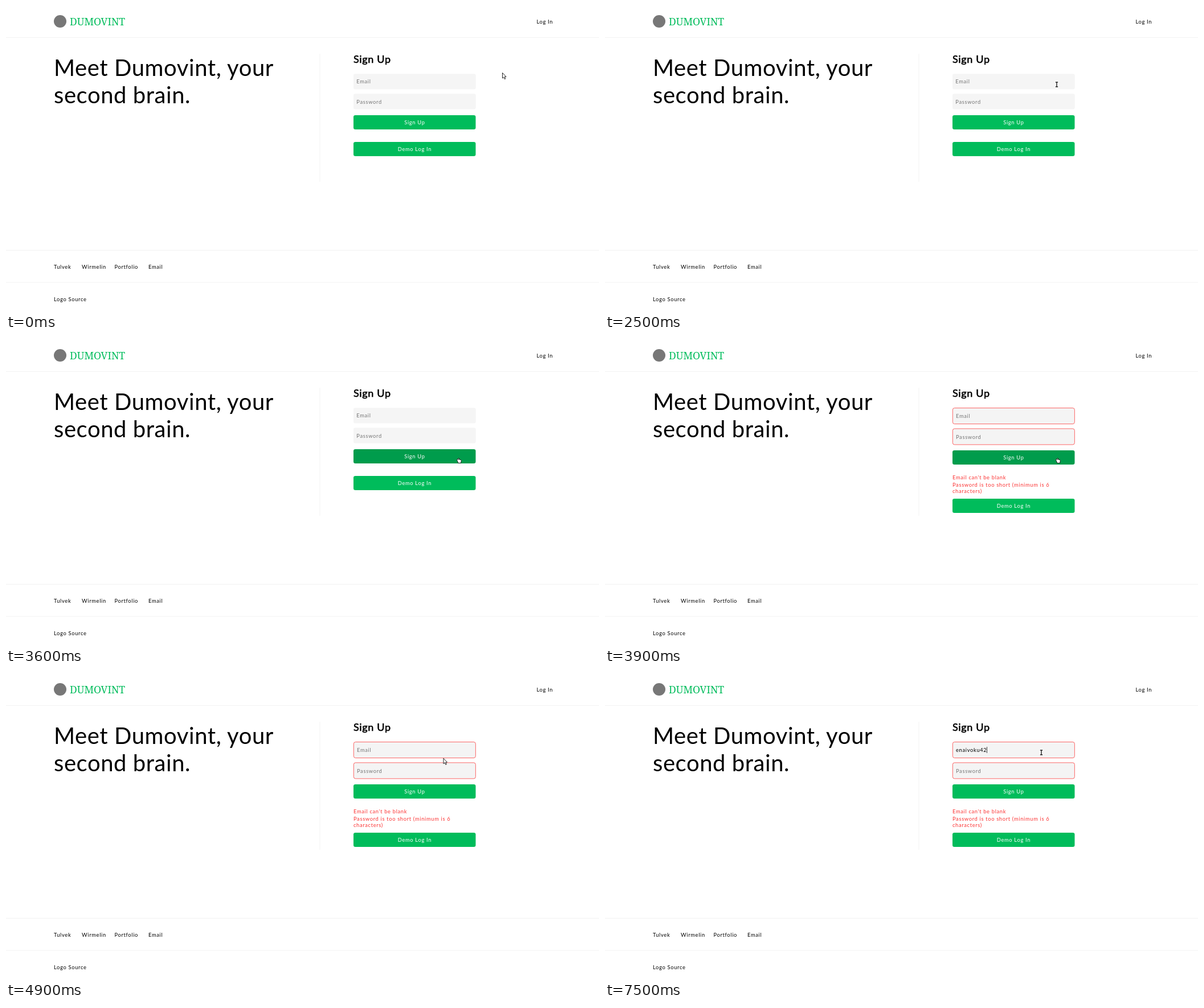
Recreate the animation shown at these times as an HTML page. Size 1041 by 538 pixels, loop 8000 ms.

```html
<!DOCTYPE html>
<html lang="en">
<head>
<meta charset="utf-8">
<title>Sign up</title>
<style>
  html, body { margin: 0; height: 100%; overflow: hidden; background: #fff; }
  svg { display: block; width: 1041px; height: 538px; font: 9.333px Lato, sans-serif; letter-spacing: .667px; }
  text { white-space: pre; }
  .brand { font: 17.6px "Noto Serif", serif; letter-spacing: 0; fill: #00bc5b; }
  .headline { font-size: 40px; letter-spacing: .57px; }
  .title { font-size: 18px; stroke: #000; stroke-width: .6; }
  .rule { stroke: #f2f2f2; }
  .hint { fill: #757575; }
  .label { fill: #fff; text-anchor: middle; }
  .button { fill: #00bc5b; }
  .error { fill: #fb3333; }
</style>
</head>
<body>
<svg viewBox="0 0 1041 538">
  <circle cx="95" cy="27" r="11" fill="#777"/>
  <text class="brand" x="112" y="34">DUMOVINT</text>
  <text x="931.5" y="31">Log In</text>
  <path class="rule" d="M0 55.5H1041M0 429.5H1041M0 486H1041M551 84V309"/>
  <g class="headline">
    <text x="84" y="123">Meet Dumovint, your</text>
    <text x="84" y="170.5">second brain.</text>
  </g>
  <text class="title" x="610" y="100">Sign Up</text>

  <rect id="emailBox"/>
  <rect id="passwordBox"/>
  <text id="email"></text>
  <text id="password" class="hint">Password</text>
  <rect id="caret" width="1" height="11" fill="#444"/>
  <g id="signUp">
    <rect id="signUpBox" class="button" x="610" width="214.5" height="25" rx="3.3"/>
    <text class="label" x="717.4" y="16">Sign Up</text>
  </g>
  <g id="demo">
    <rect class="button" x="610" width="214.5" height="25" rx="3.3"/>
    <text class="label" x="717.4" y="16">Demo Log In</text>
  </g>
  <g id="errors" class="error">
    <text x="610" y="244.5">Email can't be blank</text>
    <text x="610" y="258">Password is too short (minimum is 6</text>
    <text x="610" y="269">characters)</text>
  </g>

  <text x="84" y="461.5">Tulvek</text>
  <text x="133" y="461.5">Wirmelin</text>
  <text x="190.5" y="461.5">Portfolio</text>
  <text x="250" y="461.5">Email</text>
  <text x="84" y="518.5">Logo Source</text>

  <g id="pointer">
    <path id="arrow" d="M.5 .5V10L2.7 8L4.3 11.6L5.9 10.9L4.3 7.4H7Z" fill="#fff" stroke="#111" stroke-width=".9"/>
    <g id="beam" fill="none">
      <path d="M-2-4H2M-2 4H2M0-4V4" stroke="#fff" stroke-width="3" stroke-linecap="square"/>
      <path d="M-2.2-4H2.2M-2.2 4H2.2M0-4V4" stroke="#222" stroke-width="1.4"/>
    </g>
    <path id="hand" d="M-2.5 3.2Q-3 1.8-1.5 2L0 3V.5Q.8-.6 1.6 .5V2.5L4.6 3.2Q5.4 3.4 5.2 5L4.6 8.8H-.2Z" fill="#fff" stroke="#111" stroke-width=".9"/>
  </g>
</svg>
<script>
const $ = id => document.getElementById(id);
const LOOP = 8000, STEP = 100, BLINK = 600;
const FOCUS = 700, BLUR = 3600, FAIL = 3900, REFOCUS = 5300, TYPE = 6100, TYPED = 7500;
const USER = "enaivoku42";

const ramp = (t, from, to) => Math.min(1, Math.max(0, (t - from) / (to - from)));
const easeOut = (u, power) => 1 - (1 - u) ** power;
const blinkOn = (t, since) => Math.floor((t - since) / BLINK) % 2 === 0;

function set(id, attrs) {
  for (const name in attrs) $(id).setAttribute(name, attrs[name]);
}

function show(id, visible) {
  set(id, { visibility: visible ? "visible" : "hidden" });
}

// Three strokes: to the email field, down to the button, back up to the field.
function pointerAt(t) {
  const stroke = (from, to, dx, dy) => {
    const u = ramp(t, from, to);
    return [dx * easeOut(u, 3), dy * easeOut(u, 2)];
  };
  const strokes = [stroke(100, 400, -78, 21), stroke(2600, 3300, 1, 69.5), stroke(4400, 5200, -28, -69.5)];
  return strokes.reduce(([x, y], [dx, dy]) => [x + dx, y + dy], [871, 117]);
}

function caretOn(t) {
  if (t >= TYPE) return true;
  if (t >= REFOCUS) return blinkOn(t, REFOCUS);
  return t >= FOCUS && t < BLUR && blinkOn(t, FOCUS);
}

// Typing starts quickly and slows towards the last character.
function typedAt(t) {
  if (t < TYPE) return "";
  return USER.slice(0, Math.floor(1 + (USER.length - 1) * easeOut(ramp(t, TYPE, TYPED), 1.7)));
}

function drawField(id, y, failed) {
  const inset = failed ? .33 : 0;
  set(id, {
    x: 610 + inset, y: y + inset,
    width: 214.7 - 2 * inset, height: (failed ? 28.7 : 27.3) - 2 * inset, rx: 3.3,
    fill: failed ? "#f4f4f4" : "#f5f5f5", stroke: failed ? "#fb4040" : "none", "stroke-width": .8
  });
}

function draw(time) {
  const t = Math.floor(time / STEP) * STEP;
  const failed = t >= FAIL;
  const passwordY = failed ? 155.6 : 154.3, signUpY = failed ? 194 : 192, demoY = failed ? 279 : 239;
  const textX = failed ? 616 : 615.3;

  drawField("emailBox", 119.2, failed);
  drawField("passwordBox", passwordY, failed);
  const typed = typedAt(t);
  $("email").textContent = typed || "Email";
  set("email", { x: textX, y: failed ? 137 : 136.3, class: typed ? "" : "hint" });
  set("password", { x: textX, y: failed ? 173.6 : 171.8 });

  const typedWidth = typed ? $("email").getComputedTextLength() - .5 : 0;
  set("caret", { x: Math.floor(textX) + Math.round(typedWidth), y: failed ? 128 : 127 });
  show("caret", caretOn(t));

  const hover = ramp(t, 3160, 3300) - ramp(t, 4500, 4700);
  set("signUpBox", { style: `fill: rgb(0 ${188 - 32 * hover} ${91 - 15 * hover})` });
  set("signUp", { transform: `translate(0 ${signUpY})` });
  set("demo", { transform: `translate(0 ${demoY})` });
  show("errors", failed);

  const [x, y] = pointerAt(t);
  const over = (top, height) => x > 610 && x < 824 && y > top && y < top + height;
  const kind = over(signUpY, 25) ? "hand"
    : over(119, failed ? 28 : 27) || over(passwordY, 28) ? "beam" : "arrow";
  set("pointer", { transform: `translate(${x} ${y})` });
  for (const id of ["arrow", "beam", "hand"]) show(id, id === kind);
}

const start = performance.now();
function tick() {
  draw((performance.now() - start) % LOOP);
  requestAnimationFrame(tick);
}
tick();
</script>
</body>
</html>
```
